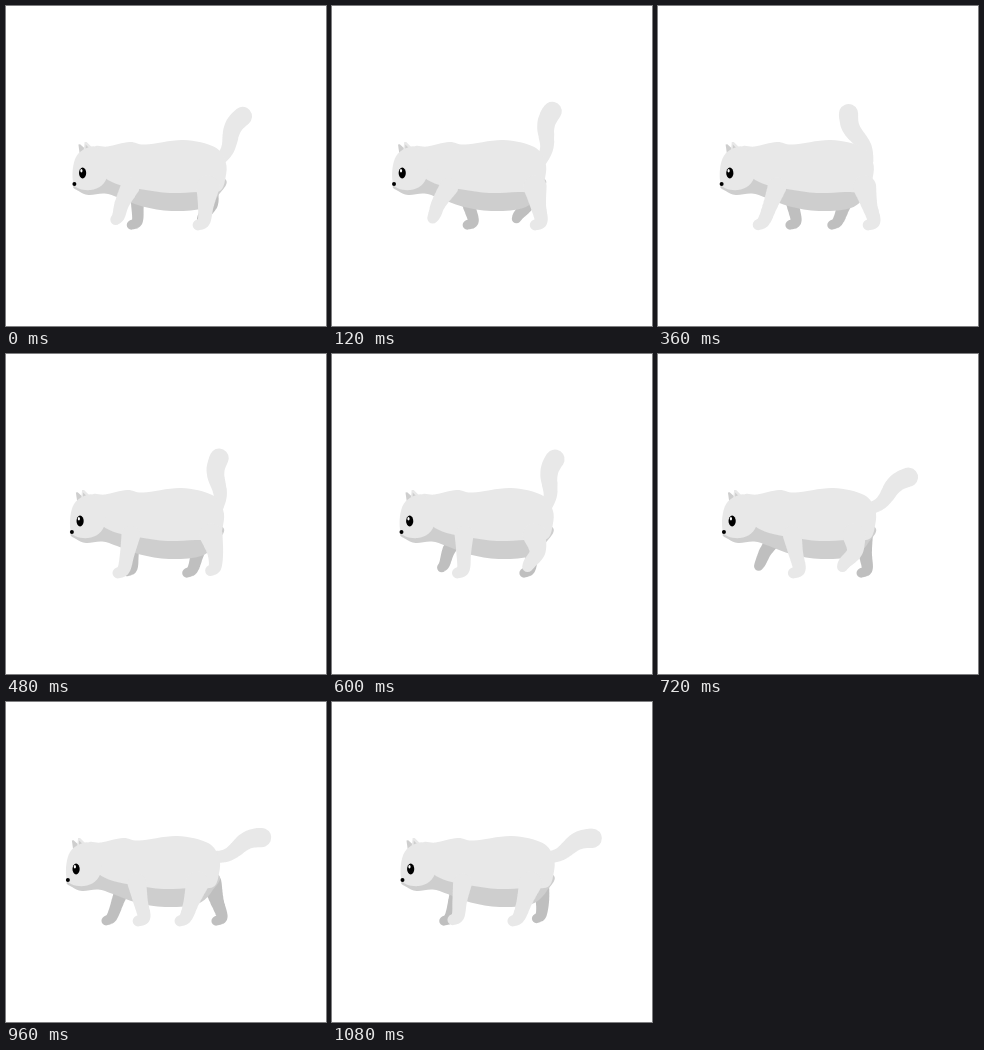
An HTML page with a canvas that plays this animation: 320x320 px, repeating every 1200 ms.

```html
<!DOCTYPE html>
<html lang="en">
<head>
<meta charset="utf-8">
<title>Walking cat</title>
<style>
html, body { margin: 0; width: 100%; height: 100%; overflow: hidden; background: #fff; }
canvas { display: block; width: 320px; height: 320px; }
</style>
</head>
<body>
<canvas id="stage" width="320" height="320"></canvas>
<script>
const LIGHT = '#e8e8e8', SHADE = '#cecece', FAR = '#bfbfbf';
const STEP = 120, STEPS = 10;
const ctx = document.getElementById('stage').getContext('2d');

// Cosine that runs n times per loop, with a crest at the step `peak`
const wave = (step, n, peak) => Math.cos(2 * Math.PI * n * (step - peak) / STEPS);
const mix = (a, b, t) => a + (b - a) * t;

const FRONT = { hip: 126, foot: 122, stride: 22, reach: 1.8, rise: 0.8, bend: -3, radii: [9.5, 7.4, 6.4, 5.4] };
const HIND = { hip: 200, foot: 198, stride: 19, reach: 7.5, rise: 5.5, bend: 6, radii: [11.5, 8, 6.4, 5.4] };

const spline = (a, b, c, d, t) =>
  b + .5 * t * (c - a + t * (2 * a - 5 * b + 4 * c - d + t * (3 * (b - c) + d - a)));

function circle(x, y, r) {
  ctx.moveTo(x + r, y);
  ctx.arc(x, y, r, 0, 7);
}

// Smooth tapered limb through points [x, y, radius]
function limb(pts, color) {
  const last = pts.length - 1, n = 14;
  ctx.fillStyle = color;
  ctx.beginPath();
  for (let i = 0; i < last; i++) {
    const a = pts[Math.max(i - 1, 0)], b = pts[i];
    const c = pts[i + 1], d = pts[Math.min(i + 2, last)];
    for (let k = 0; k <= n; k++) {
      circle(...b.map((v, j) => spline(a[j], v, c[j], d[j], k / n)));
    }
  }
  ctx.fill();
}

// Smooth closed shape through the given points
function blob(pts, color) {
  const n = pts.length, at = i => pts[(i + n) % n];
  ctx.fillStyle = color;
  ctx.beginPath();
  ctx.moveTo(...pts[0]);
  for (let i = 0; i < n; i++) {
    const a = at(i - 1), b = at(i), c = at(i + 1), d = at(i + 2);
    ctx.bezierCurveTo(
      b[0] + (c[0] - a[0]) / 6, b[1] + (c[1] - a[1]) / 6,
      c[0] - (d[0] - b[0]) / 6, c[1] - (d[1] - b[1]) / 6, c[0], c[1]);
  }
  ctx.fill();
}

function poly(pts, color) {
  ctx.fillStyle = color;
  ctx.beginPath();
  pts.forEach(p => ctx.lineTo(...p));
  ctx.fill();
}

function oval(x, y, rx, ry, color) {
  ctx.fillStyle = color;
  ctx.beginPath();
  ctx.ellipse(x, y, rx, ry, 0, 0, 7);
  ctx.fill();
}

// The foot swings to and fro and lifts on its way forward;
// far legs run half a loop later.
function drawLeg(leg, step, sway, far) {
  const s = far ? step - STEPS / 2 : step;
  const swing = -leg.stride * wave(s, 1, leg.reach);
  const lift = Math.max(0, wave(s, 1, leg.rise)) ** 2;
  const hip = leg.hip + .4 * swing + .5 * sway;
  const x = leg.foot + swing, y = 215 - 7 * lift;
  const r = leg.radii.map(v => far ? v * .86 : v);
  limb([
    [hip, 181, r[0]],
    [(hip + x) / 2 + leg.bend * lift, 199 - 2 * lift, r[1]],
    [x, y, r[2]],
    [x - 6 + 4 * lift, y + 4, r[3]]
  ], far ? FAR : LIGHT);
}

// An S-shaped tail that sweeps from side to side with a quick flutter
function drawTail(step, sway) {
  const turn = (28 + 45 * wave(step, 1, 7.8) + 8 * wave(step, 4, 1.4)) * Math.PI / 180;
  const n = 48;
  ctx.save();
  ctx.translate(210 + .5 * sway, 155);
  ctx.rotate(turn);
  ctx.fillStyle = LIGHT;
  ctx.beginPath();
  for (let i = 0; i <= n; i++) {
    const u = i / n;
    circle(3 * Math.sin(2 * Math.PI * u), -51 * u, mix(6, 9.6, u * u * (3 - 2 * u)));
  }
  ctx.fill();
  ctx.restore();
}

// Chin and belly in shade
function drawBelly() {
  blob([[65, 179], [69, 185], [79, 189], [95, 187.5], [110, 192], [133, 200.5],
    [162, 205], [194, 202], [209, 189], [214, 172], [160, 165], [95, 167]], SHADE);
}

function drawBack() {
  blob([[85, 141], [98, 140.5], [120, 136], [136, 138.5], [174, 134], [205, 141],
    [216, 156], [216, 171], [210, 185], [188, 186], [160, 187], [133, 183.5],
    [110, 179], [95, 171.5], [83, 157]], LIGHT);
}

// Drawn around the eye
function drawHead() {
  ctx.save();
  ctx.translate(73, 167);
  poly([[-3, -20], [-4.2, -28.5], [-2.5, -28.8], [5, -22]], SHADE);
  poly([[1, -22], [2, -31], [4, -31], [11, -24]], LIGHT);
  poly([[3, -24], [3, -28.5], [7, -24.5]], SHADE);
  blob([[-9.8, -4], [-6, -17], [3, -24.5], [14, -26], [24, -14], [25, 2],
    [19, 12.5], [8, 17], [-4, 15.5], [-9.3, 10]], LIGHT);
  oval(0, 0, 3.6, 5.4, '#000');
  oval(-1.2, -2.2, 1.1, 1.7, '#fff');
  oval(-8.2, 11, 2, 1.9, '#000');
  ctx.restore();
}

function draw(step) {
  const sway = 4.7 * wave(step, 2, -.39) + 2.3 * wave(step, 3, -.96);
  ctx.fillStyle = '#fff';
  ctx.fillRect(0, 0, 320, 320);

  drawTail(step, sway);
  drawLeg(FRONT, step, sway, true);
  drawLeg(HIND, step, sway, true);

  ctx.save();
  ctx.translate(sway, 0);
  drawBelly();
  drawBack();
  ctx.restore();

  drawLeg(HIND, step, sway, false);
  drawLeg(FRONT, step, sway, false);

  ctx.save();
  ctx.translate(sway, 0);
  drawHead();
  ctx.restore();
}

const start = performance.now();
let shown = -1;

function tick() {
  const step = Math.floor((performance.now() - start) / STEP) % STEPS;
  if (step !== shown) draw(shown = step);
  requestAnimationFrame(tick);
}
tick();
</script>
</body>
</html>
```
